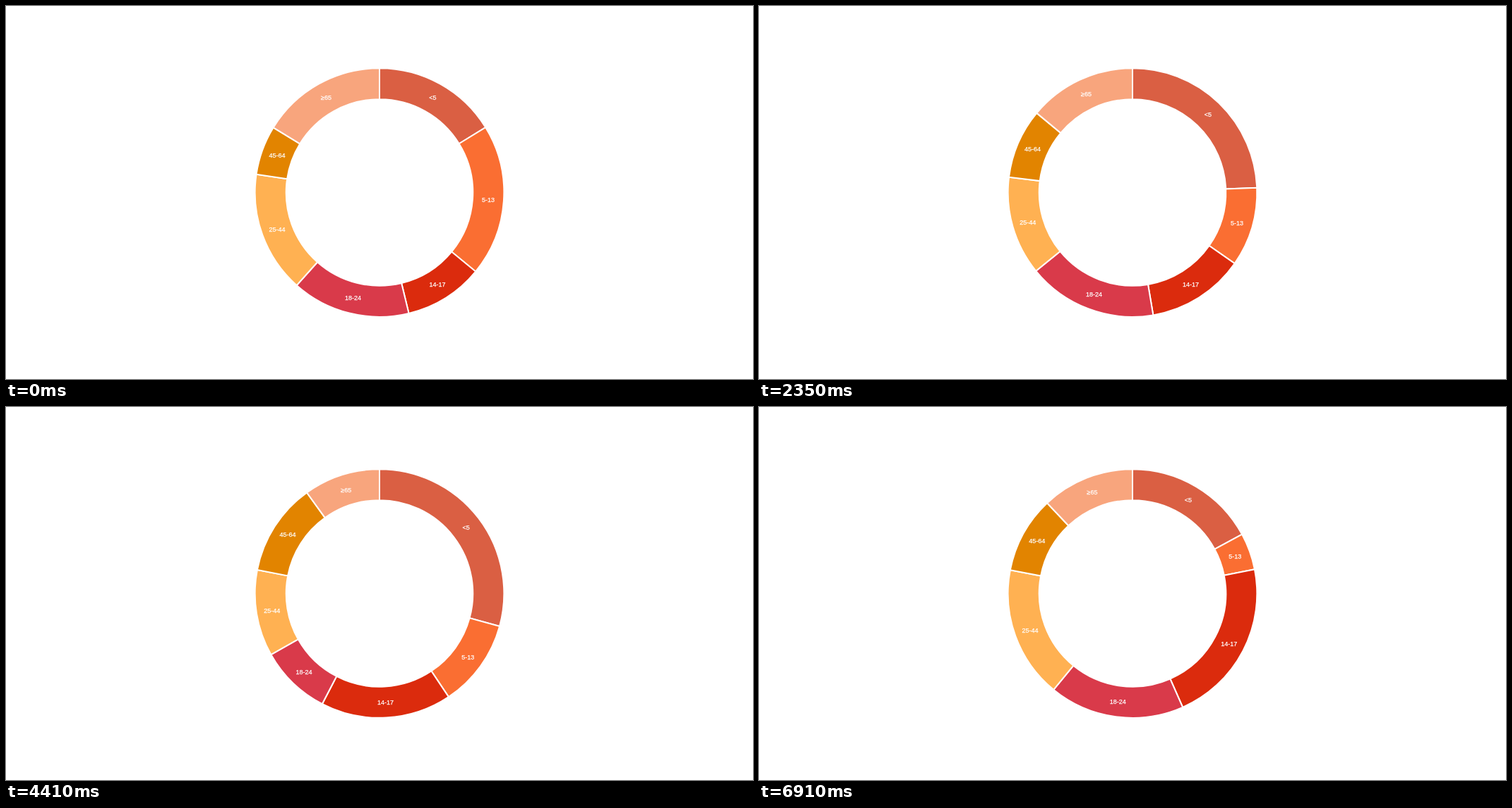
These frames come from a looping animation (1058x529 px, 7.36 s). An HTML page:

```html
<!DOCTYPE html>
<html lang="en">
<head>
<meta charset="utf-8">
<title>Age groups</title>
<style>
  html, body { margin: 0; width: 100%; height: 100%; overflow: hidden; background: #fff; }
  svg { display: block; width: 100%; height: 100%; }
  path { stroke: #fff; stroke-width: 2; }
  text { fill: #fff; stroke: #fff; stroke-width: .25; text-anchor: middle;
    font: 9px "Liberation Sans", Arial, sans-serif; }
</style>
</head>
<body>
<svg viewBox="0 0 1058 529"><g id="chart" transform="translate(529 264.5)"></g></svg>
<script>
const LOOP = 7360;
const PERIOD = 2008;
const TRANSITION = 1000;
const LEAD = 115; // the first transition is already under way at time 0
const OUTER = 529 / 3;
const INNER = OUTER * 0.75;

// Label, colour and the degrees taken up in each successive state; the last group fills the rest.
const groups = [
  ['<5', '#da5f43', 58.5, 48, 151.6, 64.1, 61.6],
  ['5-13', '#fa6e32', 71.2, 44, 25.8, 54.5, 17.2],
  ['14-17', '#db2b0d', 36.9, 40.5, 53.8, 67.6, 77.4],
  ['18-24', '#d93a4a', 55.1, 87.4, 17.2, 47.4, 63.1],
  ['25-44', '#ffb152', 56.7, 61.1, 22.5, 56.3, 61.6],
  ['45-64', '#e28400', 23.1, 15.4, 60.1, 28.4, 35.8],
  ['≥65', '#f8a57d'],
];

const chart = document.getElementById('chart');

function add(tag, attributes, content = '') {
  const node = document.createElementNS('http://www.w3.org/2000/svg', tag);
  for (const name in attributes) node.setAttribute(name, attributes[name]);
  node.textContent = content;
  return chart.appendChild(node);
}

const segments = groups.map(([name, fill, ...spans]) => ({
  spans,
  arc: add('path', { fill }),
  label: add('text', { dy: '.35em' }, name),
}));

const easeCubic = u => u < 0.5 ? 4 * u ** 3 : 1 - 4 * (1 - u) ** 3;

// Angles run clockwise in degrees from the top.
function point(angle, radius) {
  const a = angle * Math.PI / 180;
  return [radius * Math.sin(a), -radius * Math.cos(a)];
}

function ringSegment(from, to) {
  const large = to - from > 180 ? 1 : 0;
  return `M${point(from, OUTER)}A${OUTER},${OUTER} 0 ${large} 1 ${point(to, OUTER)}` +
    `L${point(to, INNER)}A${INNER},${INNER} 0 ${large} 0 ${point(from, INNER)}Z`;
}

function draw(time) {
  const elapsed = time + LEAD;
  const state = Math.floor(elapsed / PERIOD);
  const progress = easeCubic(Math.min(1, elapsed % PERIOD / TRANSITION));
  let from = 0;
  for (const { spans, arc, label } of segments) {
    const span = spans.length
      ? spans[state] + (spans[state + 1] - spans[state]) * progress
      : 360 - from;
    const [x, y] = point(from + span / 2, (OUTER + INNER) / 2);
    arc.setAttribute('d', ringSegment(from, from + span));
    label.setAttribute('x', x);
    label.setAttribute('y', y);
    from += span;
  }
}

const origin = performance.now();
function frame() {
  draw((performance.now() - origin) % LOOP);
  requestAnimationFrame(frame);
}
frame();
</script>
</body>
</html>
```
